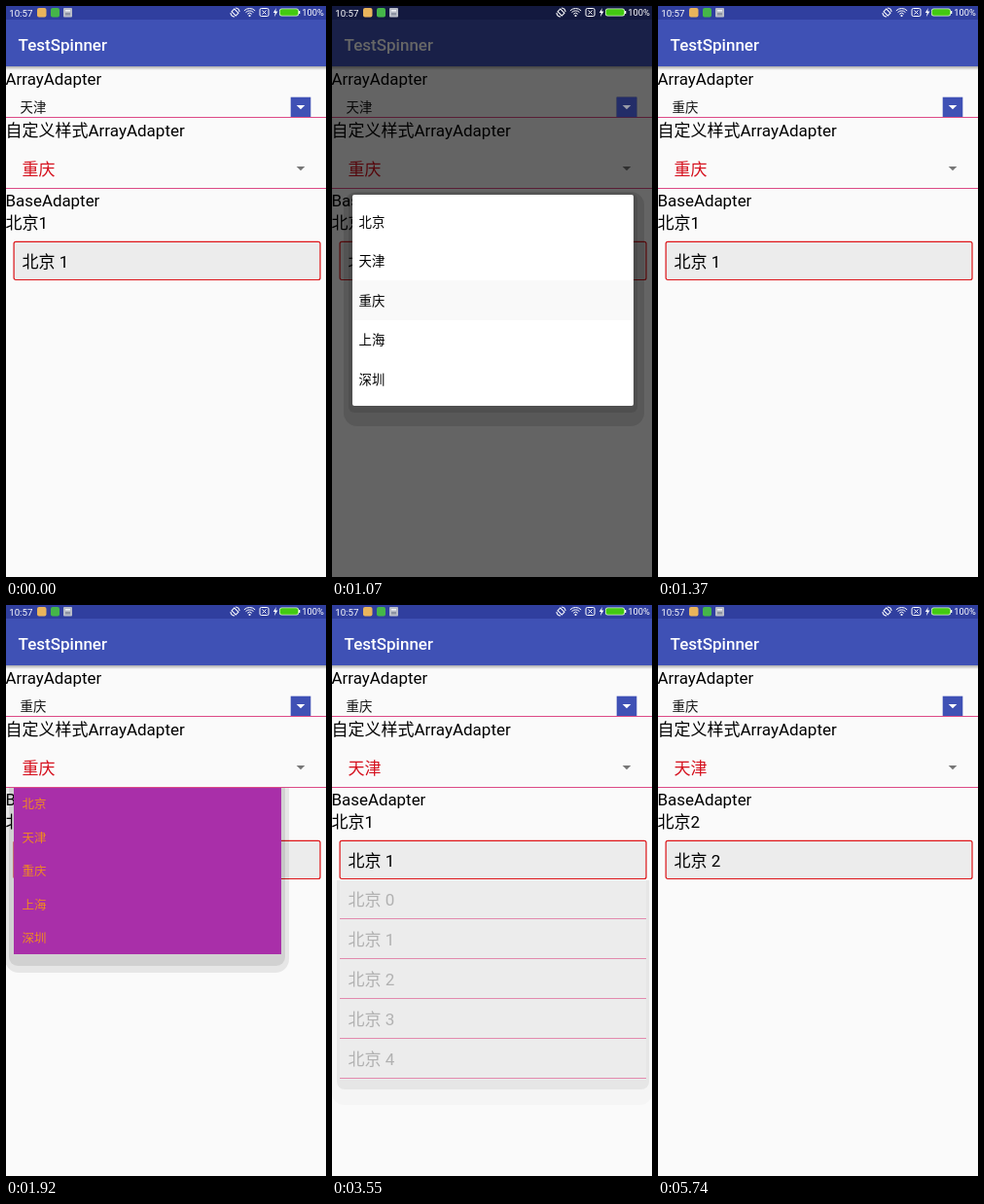
Recreate the animation shown at these times as an HTML page with a canvas. Size 329x587 px, loop 6.42 s.

```html
<!DOCTYPE html>
<html lang="zh-CN">
<head>
<meta charset="utf-8">
<title>TestSpinner</title>
<style>
html, body { margin: 0; width: 100%; height: 100%; overflow: hidden; background: #fafafa; }
canvas { display: block; width: 329px; height: 587px; }
</style>
</head>
<body>
<canvas id="stage"></canvas>
<script>
const W = 329, H = 587, LOOP = 6420;
const FONT = 'Roboto, "Noto Sans CJK SC", "Noto Sans CJK", sans-serif';
const CITIES = ['北京', '天津', '重庆', '上海', '深圳'];
const PINK = '#dc4a86', BLUE = '#3f51b5';

const canvas = document.getElementById('stage');
const ctx = canvas.getContext('2d');
const dpr = window.devicePixelRatio || 1;
canvas.width = W * dpr;
canvas.height = H * dpr;

// Value of the last step [time, value] reached at t.
function step(t, steps) {
  let value = steps[0][1];
  for (const [at, v] of steps) if (t >= at) value = v;
  return value;
}

const dialogAlpha = [[0, 0], [400, 0.5], [520, 1], [1220, 0.35], [1370, 0]];
const menuAlpha = [[0, 0], [1680, 0.25], [1800, 0.8], [1920, 1], [2630, 0.4], [2750, 0.1], [2870, 0]];
const listAlpha = [[0, 0], [3550, 0.25], [3670, 0.8], [3790, 1], [4350, 0.38], [4470, 0.1], [4620, 0]];

function text(str, x, y, size, color, weight = 400) {
  ctx.font = `${weight} ${size}px ${FONT}`;
  ctx.fillStyle = color;
  ctx.fillText(str, x, y);
}

function rect(x, y, w, h, color) {
  ctx.fillStyle = color;
  ctx.fillRect(x, y, w, h);
}

function round(x, y, w, h, r, color) {
  ctx.beginPath();
  ctx.roundRect(x, y, w, h, r);
  ctx.fillStyle = color;
  ctx.fill();
}

function poly(points, color) {
  ctx.beginPath();
  points.forEach(([x, y]) => ctx.lineTo(x, y));
  ctx.closePath();
  ctx.fillStyle = color;
  ctx.fill();
}

function arc(x, y, r, from, to) {
  ctx.beginPath();
  ctx.arc(x, y, r, from, to);
  ctx.stroke();
}

function arrow(x, y, color) {
  poly([[x - 4.3, y - 2], [x + 4.3, y - 2], [x, y + 2.3]], color);
}

function button(back, front) {
  rect(292.7, 93.7, 20.6, 20.6, back);
  arrow(303, 104, front);
}

function withAlpha(a, draw) {
  ctx.save();
  ctx.globalAlpha = a;
  draw();
  ctx.restore();
}

function statusIcons() {
  text('10:57', 3.2, 10.5, 9.7, '#fff');
  round(32, 2, 9.5, 9.5, 2, '#e9b45c');
  round(46, 2, 9, 9.5, 2, '#45b649');
  round(59, 2, 9, 9.5, 1, '#b9bdc8');
  rect(61, 4, 5, 1.5, '#eef0f4');
  rect(61, 7, 5, 2.5, '#8d93a3');

  ctx.strokeStyle = '#fff';
  ctx.lineWidth = 1;
  // vibrate
  ctx.save();
  ctx.translate(235.5, 6.5);
  ctx.rotate(-Math.PI / 4);
  ctx.strokeRect(-1.9, -3, 3.8, 6);
  arc(0, 0, 4.6, -0.7, 0.7);
  arc(0, 0, 4.6, Math.PI - 0.7, Math.PI + 0.7);
  ctx.restore();
  // wifi
  for (const r of [3.2, 5.6, 8]) arc(250.5, 10.5, r, -Math.PI * 0.75, -Math.PI * 0.25);
  round(249.4, 8.9, 2.2, 2.2, 1.1, '#fff');
  // no sim
  ctx.beginPath();
  ctx.roundRect(261, 2.5, 9, 8, 1.5);
  ctx.moveTo(263.5, 4.5);
  ctx.lineTo(267.5, 8.5);
  ctx.moveTo(267.5, 4.5);
  ctx.lineTo(263.5, 8.5);
  ctx.stroke();
  // charge
  poly([[277.8, 2], [274.8, 7], [276.8, 7], [275.8, 11.3], [279.4, 5.6], [277.2, 5.6]], '#fff');
  round(281, 2.5, 20, 8, 2.5, '#d9f2cf');
  round(281.7, 3.2, 18.6, 6.6, 2, '#43c912');
  rect(301, 5, 1.3, 3, '#fff');
  text('100%', 304.3, 10.3, 9.3, '#fff');
}

function page(t) {
  rect(0, 0, W, H, '#fafafa');
  const shade = ctx.createLinearGradient(0, 62, 0, 66);
  shade.addColorStop(0, 'rgba(0,0,0,.32)');
  shade.addColorStop(1, 'rgba(0,0,0,0)');
  rect(0, 62, W, 4, shade);
  rect(0, 0, W, 62, BLUE);
  rect(0, 0, W, 14, '#303f9f');
  text('TestSpinner', 12.6, 45.8, 17, '#fff', 500);

  text('ArrayAdapter', -0.5, 80.5, 16.9, '#000');
  text(t < 1220 ? '天津' : '重庆', 14.5, 109, 13.4, '#111');
  button(BLUE, '#fff');
  rect(0, 114, W, 1, PINK);

  text('自定义样式ArrayAdapter', -0.5, 133.5, 17, '#000');
  text(t < 2630 ? '重庆' : '天津', 16.5, 174, 17, '#d50f1c');
  arrow(303, 167, '#757575');
  rect(0, 187, W, 1, PINK);

  const n = t < 4350 ? 1 : 2;
  text('BaseAdapter', -0.5, 206, 16.9, '#000');
  text('北京' + n, -0.5, 228.8, 17, '#000');
  round(7.7, 242, 315.6, 40, 2, '#ececec');
  ctx.strokeStyle = '#dd1418';
  ctx.lineWidth = 1.2;
  ctx.beginPath();
  ctx.roundRect(8.1, 242.3, 314.9, 39.2, 2);
  ctx.stroke();
  text('北京 ' + n, 16.5, 269, 17, '#000');
}

function dialog(t, a) {
  withAlpha(a, () => {
    rect(0, 0, W, H, 'rgba(0,0,0,.6)');
    if (t >= 670) button('#232d68', '#9a9da8');
    round(12, 191, 309, 241, 14, 'rgba(0,0,0,.12)');
    round(17, 193, 297, 225, 6, 'rgba(0,0,0,.1)');
    round(21, 194, 289, 217, 2, '#fff');
    rect(21, 282, 289, 41, '#f9f9f9');
    CITIES.forEach((c, i) => text(c, 27.5, 226.5 + i * 40.6, 13.4, '#000'));
  });
}

function menu(a) {
  withAlpha(a, () => {
    ctx.beginPath();
    ctx.rect(0, 188, W, H);
    ctx.clip();
    round(-1, 175, 292, 203, 14, 'rgba(0,0,0,.08)');
    round(3, 180, 284, 191, 9, 'rgba(0,0,0,.09)');
    rect(8, 187, 275, 172, '#a92fa9');
    CITIES.forEach((c, i) => text(c, 16.5, 209 + i * 34.5, 12.5, '#f08a20'));
  });
}

function list(t, a) {
  const body = Math.min(1, a * 2.4);
  withAlpha(body, () => {
    ctx.beginPath();
    ctx.rect(0, 283, W, H);
    ctx.clip();
    round(0, 270, 329, 244, 12, 'rgba(0,0,0,.03)');
    round(5, 275, 321, 223, 8, 'rgba(0,0,0,.1)');
    rect(8, 283, 315, 205, '#f0f0f0');
    if (t >= 4350) {
      ctx.save();
      ctx.beginPath();
      ctx.rect(8, 364, 315, 40);
      ctx.clip();
      round(110, 337.5, 93, 93, 46.5, '#e2e2e2');
      ctx.restore();
    }
    for (let i = 0; i < 5; i++) rect(8, 322 + i * 41, 315, 1, PINK);
  });
  withAlpha(a, () => {
    for (let i = 0; i < 5; i++) text('北京 ' + i, 16.5, 309 + i * 41, 17, '#000');
  });
}

function draw(t) {
  ctx.setTransform(dpr, 0, 0, dpr, 0, 0);
  page(t);
  const d = step(t, dialogAlpha), m = step(t, menuAlpha), l = step(t, listAlpha);
  if (d) dialog(t, d);
  if (m) menu(m);
  if (l) list(t, l);
  statusIcons();
}

const start = performance.now();
function tick() {
  draw((performance.now() - start) % LOOP);
  requestAnimationFrame(tick);
}
tick();
</script>
</body>
</html>
```
